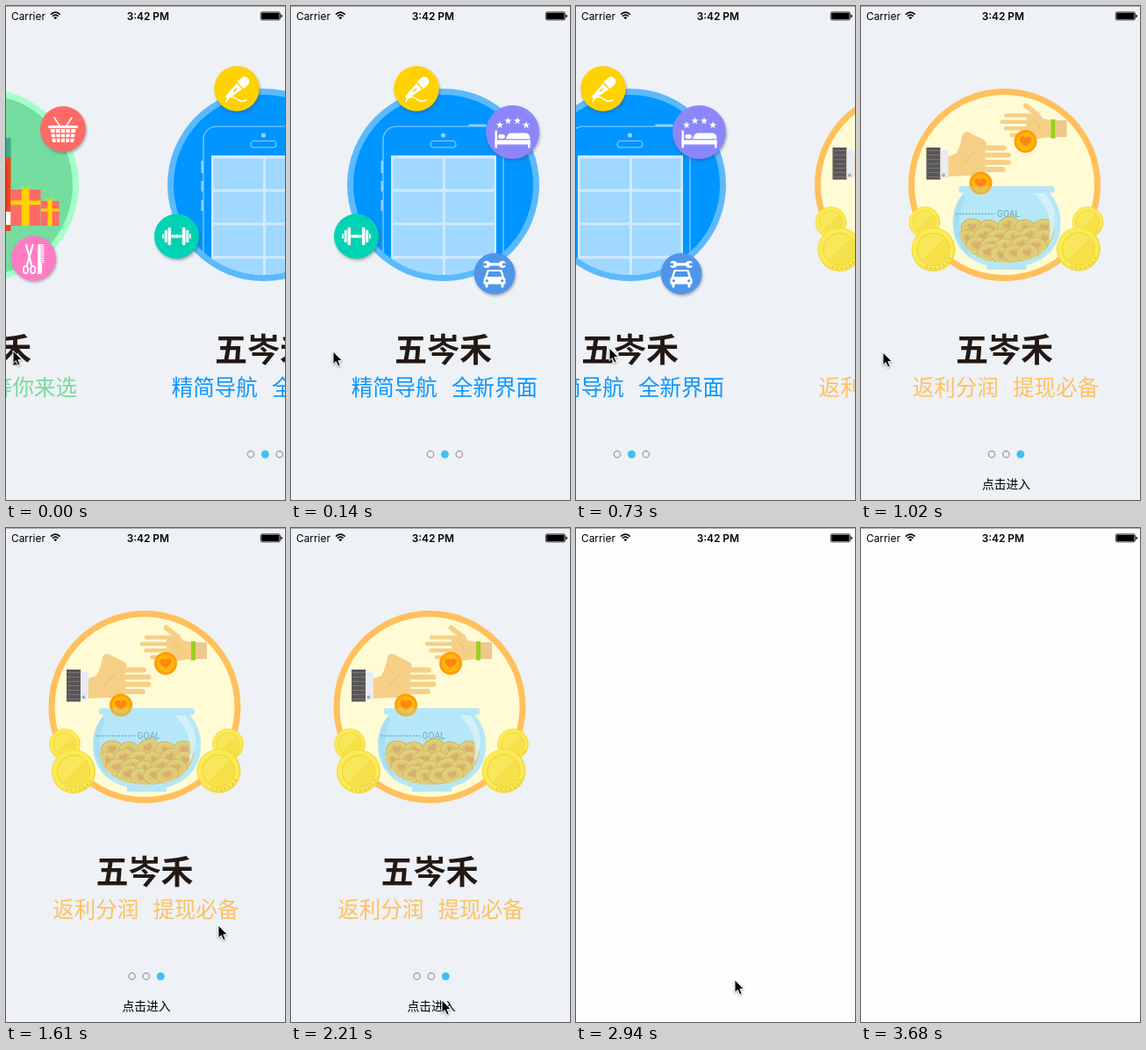
These frames come from a looping animation (318 px wide and 562 px high, 4.06 s). An HTML page:

```html
<!DOCTYPE html>
<html lang="zh-CN">
<head>
<meta charset="utf-8">
<title>Intro pages</title>
<style>
  html, body { margin: 0; width: 100%; height: 100%; overflow: hidden; background: #fefefe; }
  svg { display: block; width: 100%; height: 100%; }
  text { font-family: "Noto Sans CJK SC", "Noto Sans CJK", sans-serif; }
  .ui { font-family: Inter, Roboto, sans-serif; font-size: 11.9px; }
  .badge { filter: drop-shadow(1px 2px 1.5px rgba(60, 70, 90, .4)); }
</style>
</head>
<body>
<svg id="stage" viewBox="0 0 318 562"></svg>
<script>
const LOOP = 4060, PAGE = 320, CENTER = 158;

const pointer = [
  [0, 8, 392], [140, 48, 393], [290, 188, 393], [440, 236, 388], [580, 229, 388],
  [730, 38, 389], [880, 27, 392], [1020, 25, 394], [1170, 158, 420], [1320, 248, 438],
  [1470, 246, 435], [1610, 242, 452], [1760, 210, 489], [1910, 186, 523], [2060, 174, 534],
  [2210, 172, 537], [2350, 165, 545], [2640, 165, 545], [2790, 171, 543], [2940, 181, 514],
  [3080, 221, 390], [3230, 251, 376], [3380, 287, 502], [3530, 288, 561], [3680, 288, 600]
];
const scroll = [[0, 135.5], [140, 15.5], [290, 0], [580, 0], [730, -96.5], [880, -264], [1020, -314.5], [1170, -320]];
const fade = [[2350, 1], [2640, .55], [2790, 0]];

const circle = (x, y, r, fill, more = '') => `<circle cx="${x}" cy="${y}" r="${r}" fill="${fill}" ${more}/>`;
const rect = (x, y, w, h, fill, more = '') => `<rect x="${x}" y="${y}" width="${w}" height="${h}" fill="${fill}" ${more}/>`;
const path = (d, fill, more = '') => `<path d="${d}" fill="${fill}" ${more}/>`;
const line = (d, color, w, more = '') => path(d, 'none', `stroke="${color}" stroke-width="${w}" stroke-linecap="round" stroke-linejoin="round" ${more}`);
const group = (transform, body) => `<g transform="${transform}">${body}</g>`;
const badge = (x, y, r, fill, icon) => group(`translate(${x} ${y})`, circle(0, 0, r, fill, 'class="badge"') + icon);
const repeat = (n, fn) => Array.from({ length: n }, (_, i) => fn(i)).join('');

function star(x, y, r) {
  const pts = Array.from({ length: 10 }, (_, i) => {
    const a = -Math.PI / 2 + i * Math.PI / 5, d = i % 2 ? r * .42 : r;
    return `${(x + d * Math.cos(a)).toFixed(2)},${(y + d * Math.sin(a)).toFixed(2)}`;
  });
  return `<polygon points="${pts.join(' ')}" fill="#fff"/>`;
}

const heart = (s, fill) => path('M0,6C-3,3-7,1-7,-2.5C-7,-6-2,-7 0,-3.5C2,-7 7,-6 7,-2.5C7,1 3,3 0,6Z', fill, `transform="scale(${s})"`);

const mic = group('rotate(-42)',
    path('M4,-4.6L-15,-2.2Q-17,0 -15,2.2L4,4.6Z', '#fff') +
    path('M5.5,-5.4H12A5.4,5.4 0 0 1 12,5.4H5.5Z', '#fff') +
    rect(-5, -.9, 5, 1.8, '#ffd200')) +
  line('M-12,15C-10,8-4,9-1,11S5,16 11,13', '#fff', 1.5);

const bed = star(-14.5, -8, 4.3) + star(-5, -12.8, 4.3) + star(5.5, -12.8, 4.3) + star(15.5, -8, 4.3) +
  rect(-20, -2, 2.4, 20, '#fff') + rect(-20, 9, 40, 5, '#fff') + rect(17.6, 9, 2.4, 9, '#fff') +
  rect(-16.5, 2.5, 8, 5, '#fff', 'rx="2.4"') +
  path('M-8,7.8L-5,2.5Q-4,1 -2,1H15Q20,1.5 20,7.8Z', '#fff');

const weight = repeat(2, i => group(`scale(${i ? -1 : 1} 1)`,
  rect(-16.5, -2.5, 2, 5, '#fff') + rect(-13.8, -7, 3, 14, '#fff', 'rx="1"') +
  rect(-10, -10, 3.6, 20, '#fff', 'rx="1"') + rect(-6, -1.6, 7, 3.2, '#fff')));

const car = rect(-9, -12.2, 18, 3.2, '#fff') +
  repeat(2, i => group(`scale(${i ? -1 : 1} 1)`, circle(-9, -10.6, 4, '#fff') + rect(-14, -12, 5, 2.8, '#4f96e8'))) +
  path('M-7,-4.5H7Q8.5,-4.5 9,-3L11,4Q12.5,5 12.5,7V12H10.5V14.5Q10.5,16 9,16T7.5,14.5V12H-7.5V14.5Q-7.5,16-9,16T-10.5,14.5V12H-12.5V7Q-12.5,5-11,4L-9,-3Q-8.5,-4.5-7,-4.5Z', '#fff') +
  path('M-6.5,-2.5H6.5L8.5,3.5H-8.5Z', '#4f96e8') +
  circle(-8.7, 8, 1.6, '#4f96e8') + circle(8.7, 8, 1.6, '#4f96e8');

const basket = rect(-17, -4, 34, 3, '#fff', 'rx="1.5"') +
  path('M-14.5,0H14.5L12,15H-12Z', '#fff') +
  repeat(4, i => line(`M${-9 + i * 6},0L${-7.5 + i * 5},15`, '#ff6b64', 1.3)) +
  repeat(2, i => line(`M-14,${5 + i * 5}H14`, '#ff6b64', 1.3)) +
  line('M-4,-4L-10,-13M4,-4L10,-13', '#fff', 1.6);

const groom = line('M-8.5,-15L-2,9M-1,-15L-8,9', '#fff', 2.2) +
  repeat(2, i => `<ellipse cx="${i ? -.8 : -9}" cy="13" rx="2.6" ry="4.2" fill="none" stroke="#fff" stroke-width="1.8"/>`) +
  path('M5,-16H8V18H5Q4,0 5,-16Z', '#fff') +
  repeat(11, i => rect(8, -16 + i * 2, 4, 1.2, '#fff')) + rect(4.6, 5, 5, 13, '#fff', 'rx="2"');

function disc(ring, inner, id, body) {
  return `<clipPath id="${id}"><circle cx="0" cy="203.5" r="102.5"/></clipPath>` +
    circle(0, 203.5, 109.5, ring) + circle(0, 203.5, 102.5, inner) + `<g clip-path="url(#${id})">${body}</g>`;
}

const gift = (x, y, w, h) => rect(x, y, w, h, '#ff6b64') +
  rect(x + w * .36, y, w * .26, h, '#ffd200') + rect(x, y + h * .3, w, h * .12, '#ffd200') +
  line(`M${x + w * .5},${y}l-4,-3M${x + w * .5},${y}l4,-3`, '#ffd200', 2);

function shopPage() {
  const shop = group('translate(27 0)',
    rect(-60, 150, 65, 22, '#3dab85') + rect(-60, 172, 65, 84, '#f0431c') +
    rect(-60, 178, 61, 52, '#d93a18') + rect(-60, 234, 65, 15, '#fff') +
    gift(5, 209, 34, 41) + gift(39.5, 222, 20.5, 28));
  return disc('#a3ffc9', '#75dca0', 'clipA', shop) +
    badge(91.5, 140, 26, '#ff6b64', basket) + badge(58, 287, 25.5, '#ff7cc4', groom);
}

function phonePage() {
  const edge = '#8fd0ff';
  const phone = `<rect x="-68.5" y="137" width="137" height="230" rx="15" fill="none" stroke="${edge}" stroke-width="1.2"/>` +
    rect(29, 134.5, 20, 2.5, edge) + circle(0, 147, 2.6, edge) +
    `<rect x="-14.5" y="153.5" width="29" height="7.5" rx="3.7" fill="none" stroke="${edge}" stroke-width="1.2"/>` +
    rect(-71, 176, 2.5, 14, edge) + rect(-71, 199, 2.5, 12, edge) + rect(-71, 221, 2.5, 12, edge) +
    rect(-59.5, 170, 120, 150, '#cfeaff') +
    repeat(8, i => rect(i % 2 ? 2.5 : -57, 173.5 + (i >> 1) * 38, i % 2 ? 55.5 : 56.5, 34.8, '#a0d8ff'));
  return disc('#5bbafc', '#0095ff', 'clipB', phone) +
    badge(-30.5, 94, 25.7, '#ffd200', mic) + badge(79, 143.5, 30.5, '#8b87fb', bed) +
    badge(-99, 262, 25.5, '#00d3b4', weight) + badge(58.5, 304.5, 23.5, '#4f96e8', car);
}

const loveCoin = (x, y) => group(`translate(${x} ${y})`,
  circle(0, 0, 13, '#ff9d00') + circle(0, 0, 10.3, '#ffb60c') + heart(.95, '#ff8412'));

const goldCoin = (x, y, r) => group(`translate(${x} ${y}) scale(${r / 25})`,
  circle(0, 0, 25, '#f0da3c') + circle(-.4, -.6, 23.6, '#fdea55') +
  circle(0, 0, 18.6, '#f6e04a', 'stroke="#ecd53e" stroke-width="1"') +
  path('M-16,8A18,18 0 0 1 13,-12.4L-12,13Z', '#f9e75a') +
  line('M-11,12L12,-11', '#efda48', 1) +
  line('M-8,19.8A21.4,21.4 0 0 0 19.8,8', '#e2ca38', 2, 'stroke-dasharray="1 4"'));

function heap() {
  // Rows from back to front: [y, first x, step, count]
  const rows = [[252, 121, 20.5, 5], [263, 117, 17.5, 6], [273, 126, 17, 5], [282, 139, 15, 4]];
  return rows.map(([y, x, step, n], r) => repeat(n, i => {
    const tilt = Math.sin(i * 2.3 + r * 1.7);
    return group(`translate(${x + i * step} ${y + tilt * 2}) rotate(${tilt * 28})`,
      '<ellipse rx="12.4" ry="9.8" fill="#f2c844" stroke="#dca638" stroke-width="1.2"/>' +
      '<ellipse rx="9" ry="6.8" fill="#efbd45"/>' + heart(.72, '#e59a3c'));
  })).join('');
}

function savingPage() {
  const skin = '#f6cf87', crease = '#e5b468';
  const left = rect(69, 161, 16, 36.5, '#595757') +
    repeat(7, i => rect(69, 164 + i * 5, 16, 1, '#777575')) +
    rect(85, 163.5, 9, 32, '#e9ebf2') + circle(88.5, 192.5, 2, '#aab') +
    path('M94,171L103,168Q109,157 110,146L133,158L136,162V188L130,193L112,193L94,194Z', skin) +
    line('M115,147.5L133,156.5', skin, 9) +
    line('M128,161.5H157', skin, 5.8) + line('M128,169.7H162.5', skin, 5.8) +
    line('M128,177.9H162.5', skin, 5.8) + line('M128,186H156', skin, 5.8) +
    line('M112,179Q119,171 124,166', crease, .9);
  const right = rect(216, 130, 13, 19, '#ecc88f') + rect(210.5, 129, 5.5, 21.5, '#9bd01c') +
    path('M211,130L202,128L195,120L183,126V150L190,152L202,150L211,149Z', skin) +
    line('M182.5,113.5L196,124', skin, 6) +
    line('M188,124.5H160', skin, 4.4) + line('M188,131.8H155', skin, 4.4) +
    line('M188,139.2H159.5', skin, 4.4) + line('M188,147H166', skin, 4.4) +
    line('M192,130L198,138', crease, .8);
  const glass = path('M113,211C103,222 99,234 99,247C99,270 112,288 138,295V300H183V295C209,288 222,270 222,247C222,234 218,222 208,211Z', '#b5e7f8') +
    rect(106, 205, 109, 7.5, '#b5e7f8', 'rx="3"');
  const bowl = glass + path('M110,215C95,236 97,268 120,286C105,264 102,238 114,218Z', '#9fdcf1') +
    '<clipPath id="inside"><path d="M106,236H215V252C213,277 195,292 160,292S108,277 106,252Z"/></clipPath>' +
    `<g clip-path="url(#inside)">${heap()}</g>` + loveCoin(131, 201.5) +
    `<g opacity=".28">${glass}</g>` +
    path('M192,213H204C219,230 219,252 208,268C213,245 208,228 192,213Z', '#d9f4fc', 'opacity=".85"') +
    line('M103.5,236.5H147', '#67b1c2', 1.3, 'stroke-dasharray="1 2.6"') +
    '<text x="149.6" y="240.2" style="font:10.2px Roboto,sans-serif" fill="#6fa9b5">GOAL</text>';
  return disc('#ffc05c', '#fffbd5', 'clipC', '') +
    group('translate(-158 0)', left + right + bowl + loveCoin(182, 154) +
      goldCoin(67, 246, 17.8) + goldCoin(77, 277, 25) + goldCoin(253, 246, 17.8) + goldCoin(242.5, 276.5, 25));
}

function page(i, art, color, first, second, extra = '') {
  const dots = repeat(3, n => {
    const x = -14.5 + n * 16.4;
    return n === i ? circle(x, 510, 4.5, '#3fc1f0') : circle(x, 510, 3.7, 'none', 'stroke="#a2a5a9" stroke-width="1.4"');
  });
  return `<g class="page">${art}
    <text x="0" y="405" text-anchor="middle" font-size="37" font-weight="700" fill="#231815">五岑禾</text>
    <g font-size="24.5" font-weight="500" fill="${color}"><text x="-104.8" y="443">${first}</text><text x="9.4" y="443">${second}</text></g>
    ${dots}${extra}</g>`;
}

const status = rect(0, 0, 318, 1, '#a9abad') +
  '<text class="ui" x="6" y="15.6">Carrier</text>' +
  '<text class="ui" x="161.8" y="15.6" text-anchor="middle" font-weight="600">3:42 PM</text>' +
  line('M51,9.6Q56.3,4.6 61.6,9.6', '#000', 1.7, 'style="stroke-linecap:butt"') +
  line('M53,11.8Q56.3,8.6 59.6,11.8', '#000', 1.6, 'style="stroke-linecap:butt"') +
  path('M54.4,13.2Q56.3,11.4 58.2,13.2L56.3,15.2Z', '#000') +
  '<rect x="290.4" y="6.9" width="22" height="9" rx="1.6" fill="none" stroke="#000" stroke-width=".8"/>' +
  rect(291.3, 7.8, 20.2, 7.2, '#000', 'rx=".8"') + path('M313.4,9.6Q315,10 315,11.4T313.4,13.2Z', '#000');

const hint = '<text x="2" y="549.2" text-anchor="middle" font-size="13.8" fill="#000">点击进入</text>';

const stage = document.getElementById('stage');
stage.innerHTML = rect(0, 0, 318, 562, '#fefefe') +
  `<g id="pages">${rect(0, 0, 318, 562, '#eef1f5')}` +
  page(0, shopPage(), '#7ad9a0', '海量好店', '等你来选') +
  page(1, phonePage(), '#0a96ff', '精简导航', '全新界面') +
  page(2, savingPage(), '#ffc15f', '返利分润', '提现必备', hint) + '</g>' + status +
  path('M0,0V14.5L3.3,11.5L5.7,17L8.2,15.9L5.9,10.6H10.4Z', '#000', 'id="arrow" stroke="#fff" stroke-width="1" style="filter:drop-shadow(0 1px 1px rgba(0,0,0,.35))"');

const pagesEl = document.getElementById('pages');
const pageEls = [...document.querySelectorAll('.page')];
const arrow = document.getElementById('arrow');

function valueAt(track, t) {
  const next = track.findIndex(k => k[0] > t);
  if (next < 0) return track[track.length - 1][1];
  if (next === 0) return track[0][1];
  const [t0, a] = track[next - 1], [t1, b] = track[next];
  return a + (b - a) * (t - t0) / (t1 - t0);
}

function render(time) {
  const [tick, x, y] = pointer.filter(k => k[0] <= time).pop();
  const shift = valueAt(scroll, tick);
  pageEls.forEach((el, i) => el.setAttribute('transform', `translate(${CENTER + shift + PAGE * (i - 1)} 0)`));
  pagesEl.setAttribute('opacity', valueAt(fade, tick));
  arrow.setAttribute('transform', `translate(${x} ${y})`);
}

const start = performance.now();
function loop() {
  render((performance.now() - start) % LOOP);
  requestAnimationFrame(loop);
}
loop();
</script>
</body>
</html>
```
